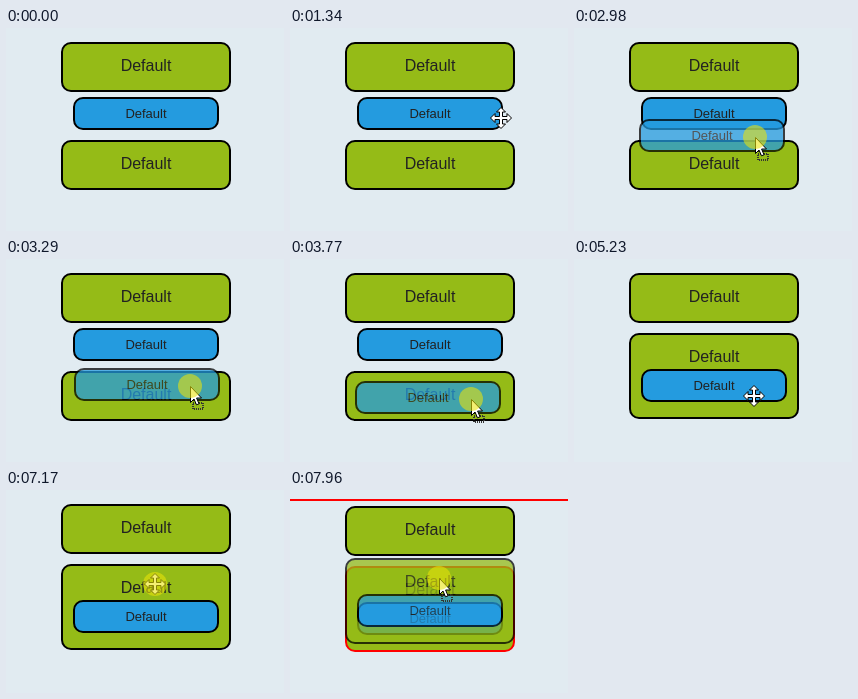
Write an HTML page that moves like this. It is 278x203 px and loops after 8 s.

```html
<!DOCTYPE html>
<html lang="en">
<head>
<meta charset="utf-8">
<title>Nested drag and drop</title>
<style>
  html, body { margin: 0; width: 100%; height: 100%; overflow: hidden; background: #e1ebf1; }
  svg { display: block; }
  text { font: 16px "Liberation Sans", Arial, sans-serif; text-anchor: middle; fill: #222; stroke: none; }
  .green { fill: #95bb17; }
  .blue { fill: #249bdf; }
  .label { font-size: 13px; }
</style>
</head>
<body>
<svg width="278" height="203" viewBox="0 0 278 203" stroke-width="2">
  <defs>
    <g id="small">
      <rect class="blue" x="1" y="1" width="144" height="31" rx="9"/>
      <text class="label" x="73" y="21">Default</text>
    </g>
    <g id="large">
      <rect class="green" x="1" y="1" width="168" height="48" rx="9"/>
      <text x="85" y="29">Default</text>
    </g>
    <g id="tall">
      <rect class="green" x="1" y="1" width="168" height="84" rx="9"/>
      <text x="85" y="29">Default</text>
      <use href="#small" x="12" y="36" stroke="#000"/>
    </g>
  </defs>
  <rect id="bar" y="9" width="278" height="2" fill="#f00"/>
  <g id="page" stroke="#000">
    <use href="#large" x="55" y="14"/>
    <g id="before">
      <use id="item" href="#small" x="67" y="69"/>
      <use href="#large" x="55" y="112"/>
    </g>
    <use id="after" href="#tall" x="55" y="74"/>
  </g>
  <use id="ghost" stroke="#000" opacity=".74"/>
  <g id="cursor" fill="#fff" stroke="#000" stroke-width="1">
    <path id="cross" d="M-1.5-1.5V-6H-4.5L0-10.5 4.5-6H1.5V-1.5H6V-4.5L10.5 0 6 4.5V1.5H1.5V6H4.5L0 10.5-4.5 6H-1.5V1.5H-6V4.5L-10.5 0-6-4.5V-1.5Z"/>
    <rect id="badge" x="3" y="17" width="10" height="6" fill="none" stroke="#333" stroke-width="2" stroke-dasharray="1 1"/>
    <path id="arrow" d="M.5.5V16.5L4 13 6.5 18.8 9 17.8 6.6 12H11.5Z"/>
    <circle id="press" r="12" fill="#ebe40a" fill-opacity=".58" stroke="none"/>
  </g>
</svg>
<script>
const LOOP = 8000, GRAB = 2660, LEAVE = 2900, DROP = 4150, REGRAB = 7880;
const el = id => document.getElementById(id);
const show = (id, on) => el(id).setAttribute('visibility', on ? 'visible' : 'hidden');
const set = (id, attrs) => {
  for (const key in attrs) el(id).setAttribute(key, attrs[key]);
};

// Pointer moves: first step, last step, step count, x, y
const moves = [
  [500, 1190, 10, 215, 90],
  [1340, 1880, 8, 183, 87],
  [2510, 2580, 2, 180, 91],
  [2660, 2980, 5, 181, 109],
  [3050, 3290, 4, 184, 127],
  [3360, 3770, 6, 181, 140],
  [4150, 4150, 1, 182, 141],
  [5230, 5940, 10, 161, 102],
  [6090, 6470, 6, 155, 97],
  [6640, 7020, 6, 149, 94],
  [7730, 7960, 4, 149, 88]
];

function pointer(t) {
  let x = 254, y = 184;
  for (const [start, end, count, toX, toY] of moves) {
    if (t < start) break;
    const gap = (end - start) / (count - 1) || 1;
    const part = Math.min(count, Math.floor((t - start) / gap + 0.01) + 1) / count;
    x += (toX - x) * part;
    y += (toY - y) * part;
  }
  return [Math.round(x), Math.round(y)];
}

function draw(t) {
  const [x, y] = pointer(t);
  const dropped = t >= DROP, again = t >= REGRAB;
  const dragging = again || (t >= GRAB && !dropped);
  const blocked = again || (t >= GRAB && t < LEAVE);
  const cross = !dragging && x < 213;

  show('bar', blocked);
  set('page', { transform: `translate(0 ${blocked ? 2 : 0})` });
  show('before', !dropped);
  show('after', dropped);
  set('item', { stroke: blocked ? '#f00' : '#000' });
  set('after', { stroke: blocked ? '#f00' : '#000' });

  show('ghost', dragging);
  set('ghost', again
    ? { href: '#tall', x: x - 94, y: y - 20 }
    : { href: '#small', x: x - 116, y: y - 18 });

  set('cursor', { transform: `translate(${x} ${y})` });
  show('cross', cross);
  show('arrow', t >= 500 && !cross);
  show('badge', dragging);
  show('press', (t >= 2190 && !dropped) || t >= 7170);
}

const begin = performance.now();
function tick() {
  draw((performance.now() - begin) % LOOP);
  requestAnimationFrame(tick);
}
tick();
</script>
</body>
</html>
```
